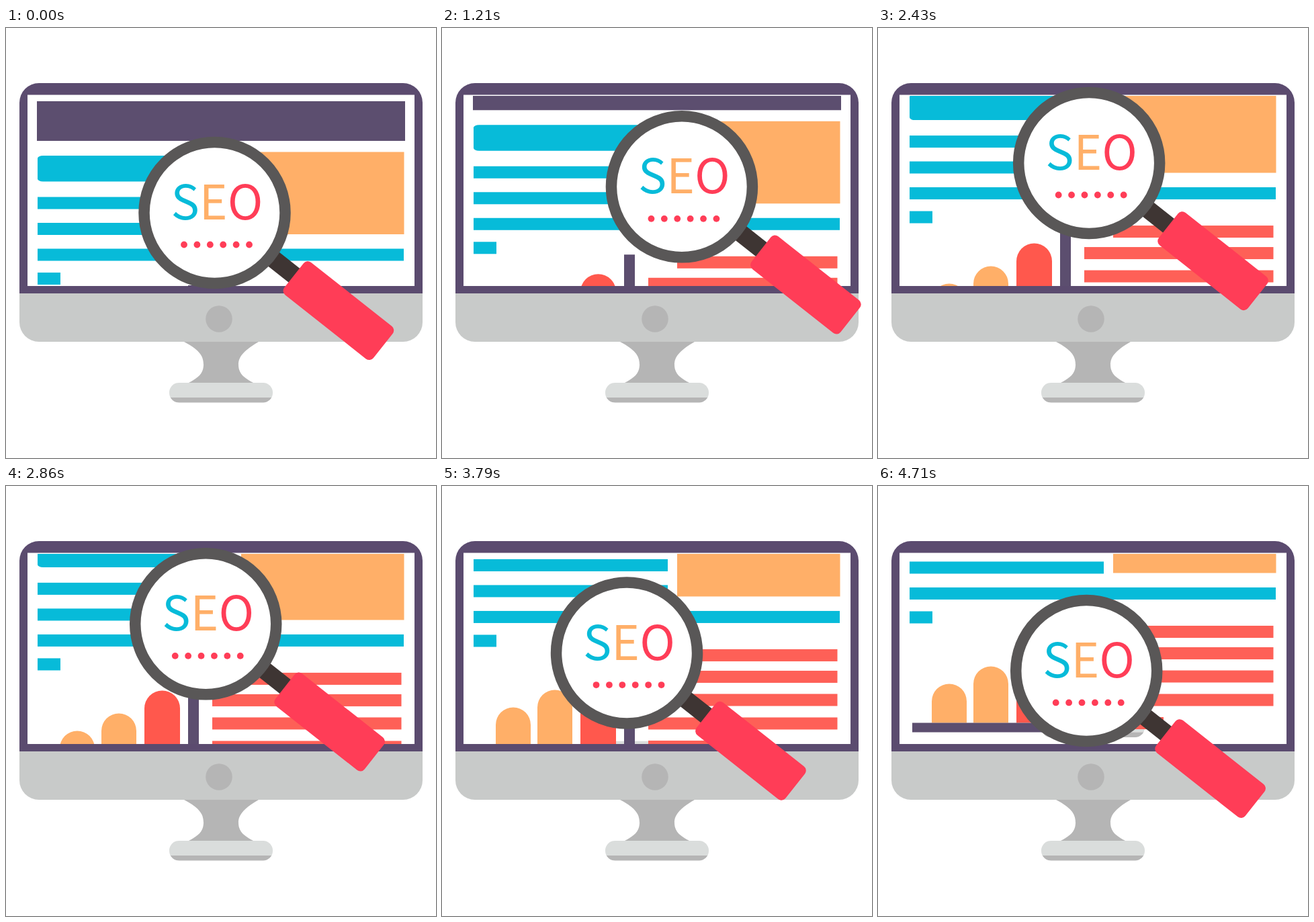
An HTML page for the animation above (4.78 s loop, 640 by 640 pixels).

```html
<!DOCTYPE html>
<html lang="en">
<head>
<meta charset="utf-8">
<title>SEO search</title>
<style>
  html, body { margin: 0; height: 100%; overflow: hidden; background: #fff; }
  svg { display: block; width: 100%; height: 100%; }
  text { font: 71px "Noto Sans CJK SC", "Noto Sans CJK JP", "Noto Sans", sans-serif; }
  .purple { fill: #5c4e6f; }
  .cyan { fill: #07bbd9; }
  .orange { fill: #ffaf68; }
  .red { fill: #fe6057; }
  .pink { fill: #ff3d57; }
  .grey { fill: #b5b5b5; }
</style>
</head>
<body>
<svg viewBox="0 0 640 640">
  <defs>
    <clipPath id="screen"><rect x="32" y="101" width="576" height="283"/></clipPath>
    <clipPath id="baseShape"><rect x="243" y="528" width="154" height="29.5" rx="14.5"/></clipPath>
    <g id="base" clip-path="url(#baseShape)">
      <rect x="243" y="528" width="154" height="22" fill="#dadddc"/>
      <rect x="243" y="550" width="154" height="8" class="grey"/>
    </g>
  </defs>

  <!-- monitor -->
  <path class="grey" d="M265 467H376C350 482 346 492 346 501C346 515 355 521 368 528H272C285 521 294 515 294 501C294 490 290 480 265 467z"/>
  <use href="#base"/>
  <path fill="#c8cac9" d="M20 395H620V438A29 29 0 0 1 591 467H49A29 29 0 0 1 20 438z"/>
  <path fill="#5b4b6f" d="M20 395V111A29 29 0 0 1 49 82H591A29 29 0 0 1 620 111V395z"/>
  <rect x="32" y="99.5" width="576" height="284.5" fill="#fff"/>
  <circle class="grey" cx="317" cy="433" r="19.8"/>

  <!-- scrolling page -->
  <g clip-path="url(#screen)">
    <g id="page">
      <rect class="purple" x="46" y="109" width="548" height="59"/>
      <rect class="cyan" x="47" y="190" width="288" height="38.5" rx="8" ry="4"/>
      <rect class="orange" x="350" y="184.5" width="242.5" height="122.5"/>
      <g class="cyan">
        <rect x="47" y="251.5" width="289" height="18"/>
        <rect x="47" y="290" width="289" height="18"/>
        <rect x="47" y="328.5" width="545" height="18"/>
        <rect x="47" y="364" width="34" height="18"/>
      </g>
      <use href="#base" y="-6"/>
      <g class="red">
        <rect x="350" y="385.5" width="238.5" height="18"/>
        <rect x="307" y="417.5" width="281.5" height="18"/>
        <rect x="307" y="452" width="281.5" height="18"/>
        <rect x="307" y="487" width="281.5" height="18"/>
        <rect x="307" y="521.5" width="118" height="18"/>
      </g>
      <path class="orange" d="M80 530V498a26 26 0 0 1 52 0V530zM142 530V472a26 26 0 0 1 52 0V530z"/>
      <path fill="#ff584d" d="M206 530V438.500a26.500 26.500 0 0 1 53 0V530z"/>
      <path class="purple" d="M271 383H287V544H51V530H271z"/>
    </g>
  </g>

  <!-- magnifier, centred on its lens -->
  <g id="lens">
    <g transform="rotate(38.3)">
      <rect x="106" y="-13.5" width="50" height="26.5" fill="#3e3533"/>
      <rect class="pink" x="150.5" y="-31" width="169" height="62" rx="8"/>
    </g>
    <circle r="105" fill="#fff" stroke="#595757" stroke-width="16.5"/>
    <text x="-65" y="10"><tspan class="cyan">S</tspan><tspan class="orange">E</tspan><tspan class="pink">O</tspan></text>
    <g id="dots" class="pink"></g>
  </g>
</svg>
<script>
const LOOP = 4780, STEP = LOOP / 67, SCROLL_SPEED = 0.0377;

// time, x, y of the lens centre
const path = [
  [0, 310.5, 275], [500, 341.5, 269], [870, 360, 255.5], [1210, 357, 236.5],
  [1710, 340.5, 210], [2430, 314, 201], [2860, 297, 205.5], [3290, 282.5, 222.5],
  [3790, 275, 249], [4000, 280, 260], [4570, 304, 274], [4715, 310.5, 275]
];
const page = document.getElementById('page');
const lens = document.getElementById('lens');
document.getElementById('dots').innerHTML = Array.from({ length: 6 }, (_, i) =>
  `<circle cx="${-45.5 + 19.4 * i}" cy="47.5" r="4.9"/>`).join('');

function slope(i, axis) {
  const a = path[Math.max(i - 1, 0)], b = path[Math.min(i + 1, path.length - 1)];
  return (b[axis] - a[axis]) / (b[0] - a[0]);
}

// cubic Hermite curve through the path points
function lensAt(t, axis) {
  const i = path.findLastIndex((p, k) => p[0] <= t && k < path.length - 1);
  const a = path[i], b = path[i + 1], span = b[0] - a[0];
  const u = Math.min((t - a[0]) / span, 1), v = 1 - u;
  return a[axis] * v * v * (1 + 2 * u) + b[axis] * u * u * (1 + 2 * v)
    + span * u * v * (slope(i, axis) * v - slope(i + 1, axis) * u);
}

function draw() {
  const t = Math.floor(((performance.now() + 3) % LOOP) / STEP) * STEP;
  page.setAttribute('transform', `translate(0 ${-t * SCROLL_SPEED})`);
  lens.setAttribute('transform', `translate(${lensAt(t, 1)} ${lensAt(t, 2)})`);
  requestAnimationFrame(draw);
}
draw();
</script>
</body>
</html>
```
